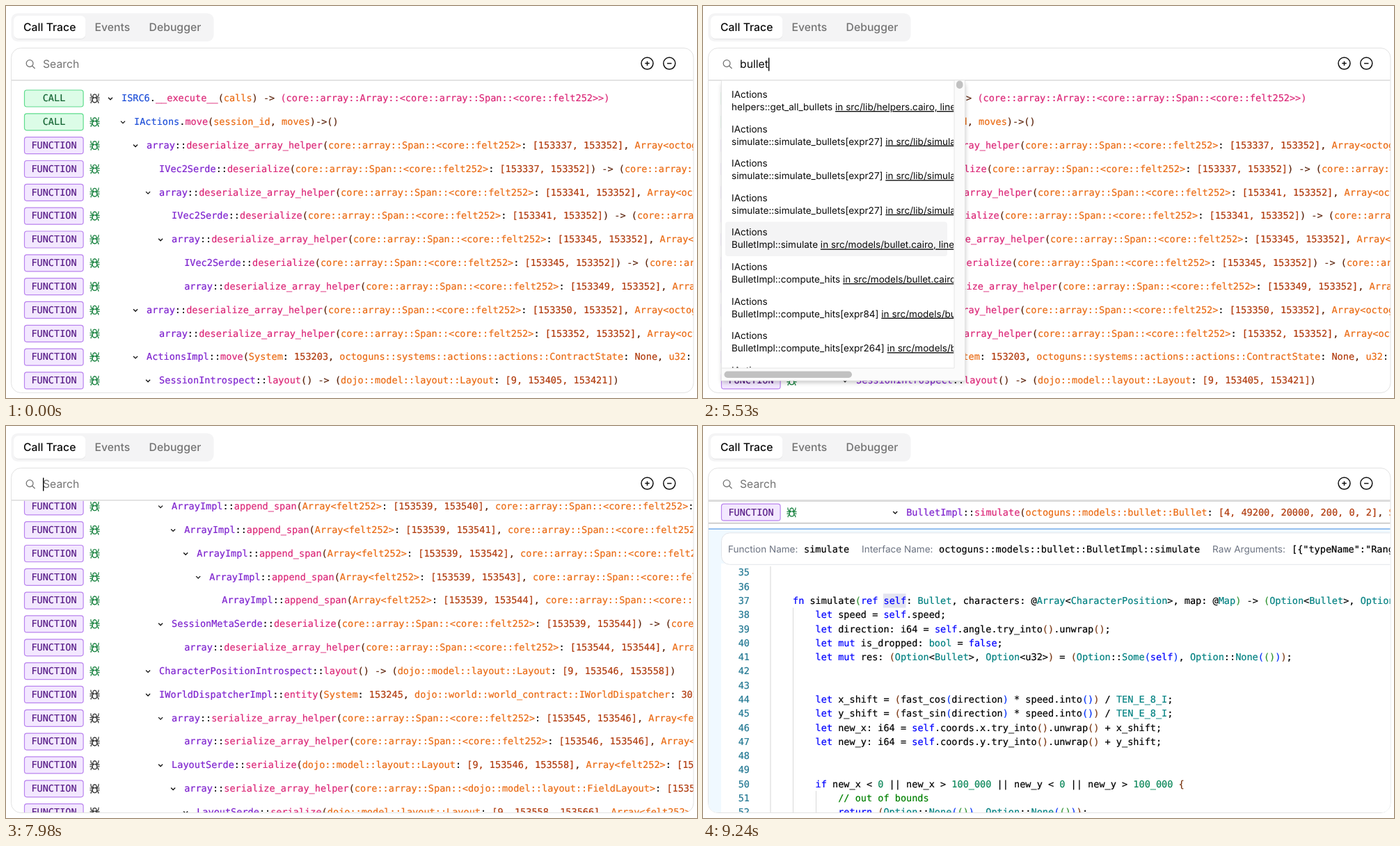
Write an HTML page that moves like this. It is 993 px wide and 564 px high and loops after 9.59 s.

```html
<!DOCTYPE html>
<html lang="en">
<head>
<meta charset="utf-8">
<title>Call Trace</title>
<style>
html, body { margin: 0; width: 100%; height: 100%; overflow: hidden; background: #fff; }
svg { display: block; width: 100vw; height: 100vh; }
text { white-space: pre; text-rendering: geometricPrecision; }
.ui { font-family: Inter, sans-serif; font-size: 15.77px; }
.small { font-family: Inter, sans-serif; font-size: 13.55px; }
.mono { font-family: "DejaVu Sans Mono", monospace; font-size: 13.55px; stroke-width: .2px; }
</style>
</head>
<body>
<svg id="stage" viewBox="0 0 993 564" xml:space="preserve">
  <defs>
    <clipPath id="bodyClip"><path d="M8 107.5H987.5V543A13 13 0 0 1 974.5 556H21A13 13 0 0 1 8 543Z"/></clipPath>
    <clipPath id="listClip"><rect x="27" y="107" width="333.5" height="414"/></clipPath>
    <filter id="soft" x="-10%" y="-10%" width="120%" height="120%"><feGaussianBlur stdDeviation="3"/></filter>
  </defs>
</svg>
<script>
const NS = 'http://www.w3.org/2000/svg';
const stage = document.getElementById('stage');
const LOOP = 9590, STEP = 70;
const ROW = 33.83, TOP = 132.6, PICK = 70;

function el(parent, name, attrs = {}, text) {
  const node = document.createElementNS(NS, name);
  for (const key in attrs) node.setAttribute(key, attrs[key]);
  if (text !== undefined) node.textContent = text;
  parent.appendChild(node);
  return node;
}
const rect = (p, x, y, width, height, fill, more = {}) =>
  el(p, 'rect', { x, y, width, height, fill, ...more });
const label = (p, cls, x, y, text, fill = '#0a0a0a', more = {}) =>
  el(p, 'text', { class: cls, x, y, fill, stroke: cls === 'mono' ? fill : 'none', ...more }, text);
const stroke = (p, d, color, width, more = {}) =>
  el(p, 'path', { d, fill: 'none', stroke: color, 'stroke-width': width, ...more });

function spans(p, x, y, parts) {
  const t = el(p, 'text', { class: 'mono', x, y });
  for (const [text, fill] of parts) if (text) el(t, 'tspan', { fill, stroke: fill }, text);
}

// ---- trace rows: [depth, has children, text, dark icon]
const SPAN = 'core::array::Span::<core::felt252>';
const pair = (a, b) => `[${a}, ${b}]`;
const unpack = (a, end) =>
  `array::deserialize_array_helper(${SPAN}: ${pair(a, end)}, Array<octoguns::types::IVec2>: [153352]`;
const vec = a =>
  `IVec2Serde::deserialize(${SPAN}: ${pair(a, 153352)}) -> (core::array::Span::<core::felt252>`;
const append = n =>
  `ArrayImpl::append_span(Array<felt252>: ${pair(153539, n)}, ${SPAN}: ${pair(n, 153544)})`;
const pack = (a, b) => `array::serialize_array_helper(${SPAN}: ${pair(a, b)}, Array<felt252>: [153546]`;
const layout = (a, b) =>
  `LayoutSerde::serialize(dojo::model::layout::Layout: [9, ${a}, ${b}], Array<felt252>: [153546, 153547]`;
const alive = n =>
  `helpers::filter_out_dead_characters[expr21](u32: ${n}, Array<u32>: ${pair(153746, 153746 + n)}, Snapshot<Array<u32>>: [1]`;
const CLONE = 'ArrayTCloneImpl::clone[expr14](core::array::Span::<octoguns::models::characters::CharacterPosition>: [1]';

const rows = [
  [0, 1, 'ISRC6.__execute__(calls) -> (core::array::Array::<core::array::Span::<core::felt252>>)', 1],
  [1, 1, 'IActions.move(session_id, moves)->()'],
  [2, 1, unpack(153337, 153352)],
  [3, 0, vec(153337)],
  [3, 1, unpack(153341, 153352)],
  [4, 0, vec(153341)],
  [4, 1, unpack(153345, 153352)],
  [5, 0, vec(153345)],
  [5, 0, unpack(153349, 153352)],
  [2, 1, unpack(153350, 153352)],
  [3, 0, unpack(153352, 153352)],
  [2, 1, 'ActionsImpl::move(System: 153203, octoguns::systems::actions::actions::ContractState: None, u32: 0'],
  [3, 1, 'SessionIntrospect::layout() -> (dojo::model::layout::Layout: [9, 153405, 153421])']
];
for (let i = 13; i < 29; i++) {
  const a = 153405 + 8 * (i - 13);
  rows.push(i < 17 ? [i - 9, 1, layout(a, a + 8), 1] : [4 + i % 4, +(i % 4 < 3), pack(a, a + 8), 1]);
}
for (let i = 0; i < 5; i++) rows.push([4 + i, +(i < 4), append(153540 + i)]);
rows.push(
  [4, 1, `SessionMetaSerde::deserialize(${SPAN}: [153539, 153544]) -> (core::option::Option`],
  [5, 0, unpack(153544, 153544)],
  [3, 1, 'CharacterPositionIntrospect::layout() -> (dojo::model::layout::Layout: [9, 153546, 153558])'],
  [3, 1, 'IWorldDispatcherImpl::entity(System: 153245, dojo::world::world_contract::IWorldDispatcher: 302', 1],
  [4, 1, pack(153545, 153546), 1],
  [5, 0, pack(153546, 153546), 1],
  [4, 1, layout(153546, 153558), 1],
  [5, 1, 'array::serialize_array_helper(core::array::Span::<dojo::model::layout::FieldLayout>: [153546, 153558]', 1],
  [6, 1, layout(153558, 153566), 1]
);
for (let i = 43; i < 60; i++) {
  const a = 153566 + 8 * (i - 43);
  rows.push([5 + i % 3, +(i % 3 < 2), i % 2 ? pack(a, a + 8) : unpack(a, a + 8), i < 50]);
}
rows.push(
  [6, 1, alive(0)], [7, 1, alive(1)], [8, 0, alive(2)],
  [6, 1, CLONE], [7, 1, CLONE], [8, 0, CLONE],
  [5, 0, 'helpers::check_is_valid_move(octoguns::types::IVec2: [400, 0, 0, 0]) -> (core::panics::PanicResult'],
  [5, 1, 'ActionsImpl::move[expr546](System: 153275, u8: 2, Array<octoguns::types::Shot>: [153364, 153366]'],
  [6, 0, 'IWorld.uuid() -> (core::integer::u32)', 1],
  [6, 1, 'simulate::simulate_bullets[expr27](Array<octoguns::models::bullet::Bullet>: [153740, 153746]'],
  [7, 1, 'BulletImpl::simulate(octoguns::models::bullet::Bullet: [4, 49200, 20000, 200, 0, 2], Span']
);

function paintTrace(text) {
  const [, owner, sep, name, rest] = text.match(/^(\w+)(\.|::)([^(]+)(.*)$/);
  const isCall = sep === '.';
  const out = [[owner, isCall ? '#1d4ed8' : '#7e22ce'], [sep, '#111'], [name, '#db2777']];
  const [args, ret] = isCall ? rest.split(/(?<=-> )(?=\()/) : [rest];
  args.split(/(: (?:\[[^\]]*\]?|[^,)]*))/).forEach((part, i) => {
    if (i % 2) out.push([': ', '#111'], [part.slice(2), '#b03a0c']);
    else part.split(/(, |->|[() ])/).forEach((bit, j) => out.push([bit, j % 2 ? '#5a2109' : '#ea6a12']));
  });
  if (ret) out.push([ret, '#db2777']);
  return out;
}

// One half of the spider icon; the other half is its mirror image.
const SPIDER = 'M0-5.6C-1.8-5.6-2.6-4.4-2.6-2.6C-2.6-1.4-1.6-.8 0-.8C-2.2-.8-3.2 .8-3.2 2.6C-3.2 4.8-2 6.2 0 6.2' +
  'M-2.4-1.4C-4.6-1.4-5.6-2.6-5.6-6M-3-.1L-6.6-.4M-3.2 2.2L-6.6 2.4M-2.8 4C-4.6 4-5.4 5-5.4 7';

function drawSpider(p, color) {
  for (const side of [1, -1])
    stroke(p, SPIDER, color, 1.2, { transform: `translate(127.5 0) scale(${side} 1)`, 'stroke-linecap': 'round' });
}

function drawRow(p, [depth, open, text, dark], i) {
  const g = el(p, 'g', { transform: `translate(0 ${TOP + i * ROW})` });
  const isCall = /^\w+\./.test(text);
  const x = 166 + depth * 18.03;
  rect(g, 26.5, -11.6, 84.6, 24, isCall ? '#dcfce7' : '#f3e8ff',
    { rx: 3.5, stroke: isCall ? '#5fdc8d' : '#b983ee', 'stroke-width': 1.2 });
  label(g, 'mono', 69, 4.7, isCall ? 'CALL' : 'FUNCTION', isCall ? '#166534' : '#581c87', { 'text-anchor': 'middle' });
  drawSpider(g, dark ? '#333' : '#15803d');
  if (open) stroke(g, `M${x - 19} -.8l3 3l3-3`, '#111', 1.3);
  spans(g, x, 4.7, paintTrace(text));
}

// ---- source view
const code = [
  [0, ''], [0, ''],
  [0, 'fn simulate(ref self: Bullet, characters: @Array<CharacterPosition>, map: @Map) -> (Option<Bullet>, Option<u32>) {'],
  [1, 'let speed = self.speed;'],
  [1, 'let direction: i64 = self.angle.try_into().unwrap();'],
  [1, 'let mut is_dropped: bool = false;'],
  [1, 'let mut res: (Option<Bullet>, Option<u32>) = (Option::Some(self), Option::None(()));'],
  [1, ''], [1, ''],
  [1, 'let x_shift = (fast_cos(direction) * speed.into()) / TEN_E_8_I;'],
  [1, 'let y_shift = (fast_sin(direction) * speed.into()) / TEN_E_8_I;'],
  [1, 'let new_x: i64 = self.coords.x.try_into().unwrap() + x_shift;'],
  [1, 'let new_y: i64 = self.coords.y.try_into().unwrap() + y_shift;'],
  [1, ''], [1, ''],
  [1, 'if new_x < 0 || new_x > 100_000 || new_y < 0 || new_y > 100_000 {'],
  [2, '// out of bounds'],
  [2, 'return (Option::None(()), Option::None(()));']
];
const BRACKETS = ['#0431fa', '#319331', '#7b3814'];

function paintCode(text, level) {
  const word = /(\/\/.*|\b(?:fn|ref|self|let|mut|if|return|false)\b|\b(?:[A-Z]\w*|bool)\b|\b\d[\d_]*|[(){}])/;
  return text.split(word).map((bit, i) => {
    if (i % 2 === 0) return [bit, '#000'];
    if (/^[({]/.test(bit)) return [bit, BRACKETS[level++ % 3]];
    if (/^[)}]/.test(bit)) return [bit, BRACKETS[--level % 3]];
    if (bit.startsWith('//')) return [bit, '#008000'];
    if (/^\d/.test(bit)) return [bit, '#098658'];
    return [bit, /^[A-Z]|bool/.test(bit) ? '#008080' : '#0000ff'];
  });
}

function drawDetail(p) {
  const g = el(p, 'g', { transform: `translate(0 ${TOP + PICK * ROW})` });
  rect(g, 8, 17, 980, 450, '#fff');
  rect(g, 8, -17, 980, 2, '#cfcfcf');
  rect(g, 8, 15, 980, 2, '#cfcfcf');
  rect(g, 8, 24, 980, 443, '#f0f9ff');
  rect(g, 8, 23.7, 980, 1.2, '#5b9be6');
  rect(g, 26, 74, 962, 393, '#fff');
  rect(g, 26.5, 30, 1000, 45.5, '#fff', { rx: 12, stroke: '#e2e5ea' });
  const info = [
    [36, 'Function Name:', 145, 'simulate'],
    [228, 'Interface Name:', 339, 'octoguns::models::bullet::BulletImpl::simulate'],
    [732, 'Raw Arguments:', 846, '[{"typeName":"RangeCheck"']
  ];
  for (const [x, key, vx, value] of info) {
    label(g, 'small', x, 58, key, '#6b7280');
    label(g, 'mono', vx, 57.8, value, '#000');
  }
  const LINE = 20.28, first = 87;
  rect(g, 96.5, 78, 1, 390, '#d6d6d6');
  rect(g, 129, first + 2.5 * LINE, 1, 320, '#d9d9d9');
  rect(g, 162, first + 15.5 * LINE, 1, 60, '#d9d9d9');
  rect(g, 259, first + 1.5 * LINE, 32.6, LINE, '#e4e4f0');
  code.forEach(([indent, text], i) => {
    const y = first + i * LINE + 4.7;
    label(g, 'mono', 67, y, 35 + i, '#237893', { 'text-anchor': 'end' });
    spans(g, 129 + indent * 32.6, y, paintCode(text, i === 2 ? 1 : 2));
  });
  return g;
}

// ---- result list
const results = [
  ['helpers::get_all_bullets', 'in src/lib/helpers.cairo, line 12'],
  ...Array(3).fill(['simulate::simulate_bullets[expr27]', 'in src/lib/simulate.cairo, line 27']),
  ['BulletImpl::simulate', 'in src/models/bullet.cairo, line 37'],
  ['BulletImpl::compute_hits', 'in src/models/bullet.cairo, line 84'],
  ['BulletImpl::compute_hits[expr84]', 'in src/models/bullet.cairo, line 84'],
  ['BulletImpl::compute_hits[expr264]', 'in src/models/bullet.cairo, line 84'],
  ['BulletImpl::compute_hits', 'in src/models/bullet.cairo, line 84']
];
const ITEM = 49.6;

function drawList(p) {
  const g = el(p, 'g');
  rect(g, 27, 112, 350, 430, '#000', { opacity: .22, filter: 'url(#soft)' });
  rect(g, 26.5, 107, 350, 432, '#fff', { stroke: '#e5e5e5' });
  const inner = el(g, 'g', { 'clip-path': 'url(#listClip)' });
  const mark = rect(inner, 32, 112, 319, 49.5, '#f4f4f5', { rx: 4 });
  results.forEach(([name, place], i) => {
    const y = 132 + i * ITEM;
    label(inner, 'small', 41, y, 'IActions');
    const t = label(inner, 'small', 41, y + 18, name + ' ');
    el(t, 'tspan', { 'text-decoration': 'underline' }, place);
  });
  rect(g, 361, 107, 15, 431.5, '#fbfbfb');
  rect(g, 27, 521, 349, 17.5, '#fbfbfb');
  rect(g, 360.5, 107, 1, 414, '#e6e6e6');
  rect(g, 27, 520.5, 334, 1, '#e6e6e6');
  rect(g, 364, 107.5, 9.5, 11.5, '#c1c1c1', { rx: 4.7 });
  rect(g, 30.5, 525.5, 183.5, 9.5, '#c1c1c1', { rx: 4.7 });
  return { g, mark };
}

// ---- page
rect(stage, 0, 0, 993, 564, '#fff');
rect(stage, 7.5, 10.5, 291, 40.5, '#f4f4f5', { rx: 9 });
rect(stage, 11.5, 15.5, 103, 32.5, '#000', { rx: 7, opacity: .07 });
rect(stage, 11, 14, 103.5, 33, '#fff', { rx: 7 });
[[25, 'Call Trace', '#0a0a0a'], [127.5, 'Events', '#737373'], [205.5, 'Debugger', '#737373']].forEach(
  ([x, name, color]) => label(stage, 'ui', x, 36.2, name, color, { 'font-weight': 500 }));
rect(stage, 7.5, 60.5, 980.5, 496, '#fff', { rx: 14, stroke: '#e2e2e2' });

const view = el(stage, 'g', { 'clip-path': 'url(#bodyClip)' });
const scroller = el(view, 'g');
rows.forEach((row, i) => drawRow(scroller, row, i));
const detail = drawDetail(scroller);
rect(stage, 8, 106, 979.5, 1.6, '#dcdcdc');
const list = drawList(stage);

stroke(stage, 'M39 82.6A4.9 4.9 0 1 1 29.2 82.6A4.9 4.9 0 1 1 39 82.6M37.7 86.2L41.6 90', '#777', 1.3);
for (const x of [921.5, 953.3]) {
  el(stage, 'circle', { cx: x, cy: 82.6, r: 8.5, fill: 'none', stroke: '#111', 'stroke-width': 1.5 });
  stroke(stage, `M${x - 3.2} 82.6h6.4` + (x < 940 ? `M${x} 79.4v6.4` : ''), '#111', 1.5);
}
const query = label(stage, 'ui', 53, 89, 'Search');
const caret = rect(stage, 53, 74.5, 1.4, 19, '#000');

// ---- time
const OPEN = 1680, CLOSE = 7630;
const typing = [[0, ''], [OPEN, 'bu'], [1820, 'bul'], [1960, 'bull'], [2170, 'bulle'], [2310, 'bullet'], [CLOSE, '']];
const picks = [[0, 0], [3430, 1], [3850, 2], [4270, 3], [4690, 4]];
const caretOn = [[490, 1050], [OPEN, 2870], [3360, 3920], [4410, 4970], [5530, 6020], [6510, 7070], [CLOSE, 8120]];
const latest = (table, t) => table.filter(([from]) => t >= from).pop()[1];
const show = (node, on) => node.setAttribute('visibility', on ? 'visible' : 'hidden');

function scrollAt(t) {
  const u = Math.min(1, Math.max(0, (t - 7570.79) / 911.71));
  return 2376.9 * (1 - Math.cos(Math.PI * u)) / 2;
}

function render(now) {
  const t = Math.floor((now % LOOP) / STEP) * STEP;
  const typed = latest(typing, t);
  query.textContent = typed || 'Search';
  query.setAttribute('fill', typed ? '#0a0a0a' : '#737373');
  caret.setAttribute('x', typed ? 53 + query.getComputedTextLength() : 53);
  show(caret, caretOn.some(([a, b]) => t >= a && t < b));
  list.g.setAttribute('display', t >= OPEN && t < CLOSE ? 'inline' : 'none');
  list.mark.setAttribute('y', 112 + latest(picks, t) * ITEM);
  show(detail, t >= CLOSE);
  scroller.setAttribute('transform', `translate(0 ${-(t >= CLOSE ? scrollAt(t) : 0)})`);
}

const start = performance.now();
function tick() {
  render(performance.now() - start);
  requestAnimationFrame(tick);
}
tick();
</script>
</body>
</html>
```
